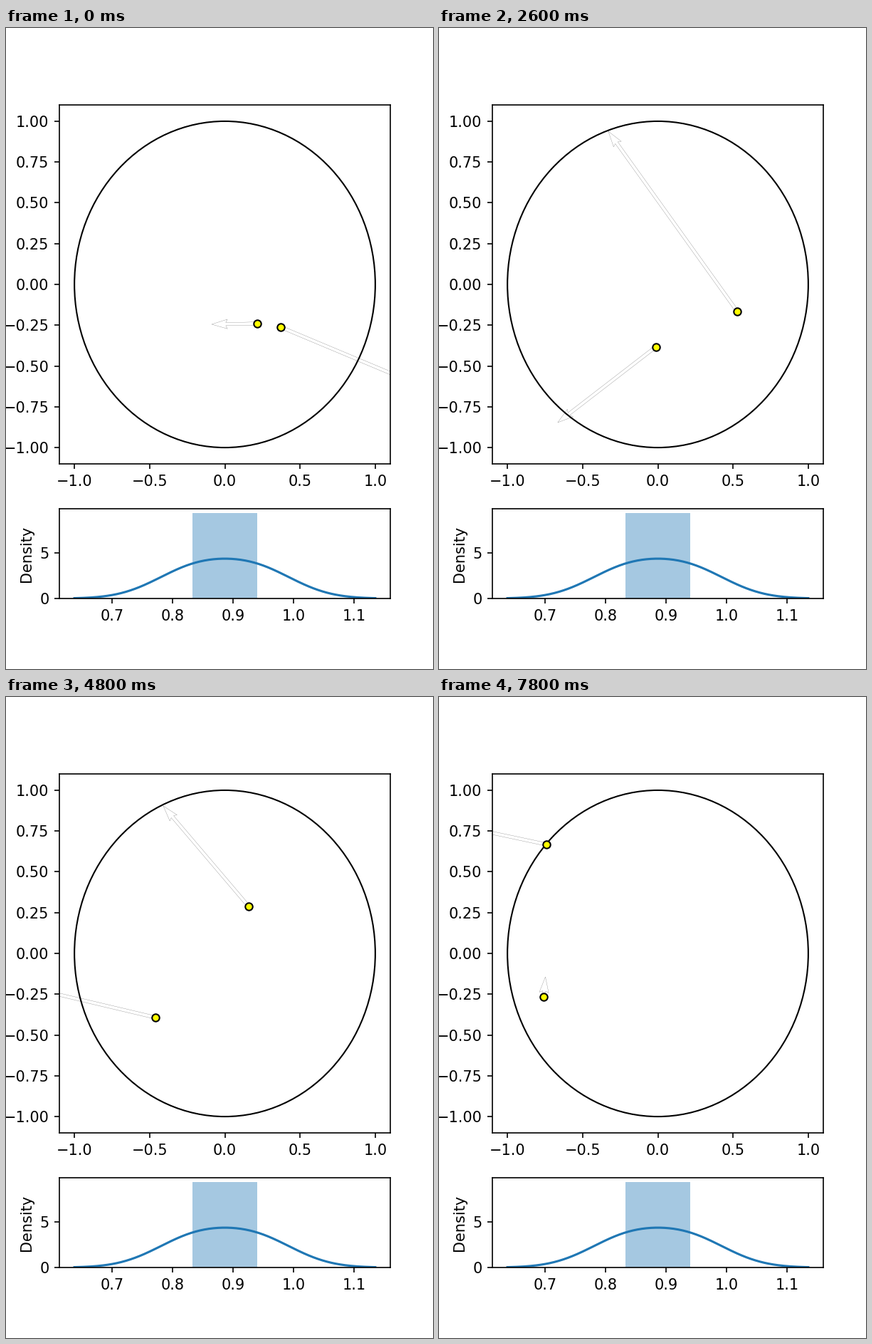
Write a matplotlib script that moves like this. It is 600x900 px and loops after 8000 ms.

```python
import numpy as np
import matplotlib.pyplot as plt
from matplotlib.animation import FuncAnimation

FRAMES, STEP = 40, 200
GAIN = 19.5   # arrow length for a speed of one pixel per frame
BOUNCE = 7    # frame at which the right particle turns back from the wall

# frame: (place, arrow) on the stage in pixels, x + y*j, y down
RIGHT = {0: (386 + 420j, 320 + 134j), 6: (482 + 466j, 320 + 133j),
         10: (452 + 436j, -253 - 239j), 16: (394 + 359j, -153 - 251j),
         24: (341 + 294j, -120 - 141j), 30: (283 + 249j, -280 - 94j),
         39: (151 + 207j, -330 - 70j)}
LEFT = {0: (353 + 415j, -64 + 1j), 6: (340 + 427j, -61 - 6j),
        10: (324 + 434j, -108 + 50j), 16: (283 + 460j, -140 + 32j),
        24: (210 + 450j, -190 - 45j), 30: (168 + 435j, -82 - 61j),
        39: (147 + 421j, 2.5 - 28j)}


def glide(keys, frame):
    """Place on a Hermite curve through the keys, and its velocity arrow."""
    times = sorted(keys)
    if frame < times[0]:
        place, arrow = keys[times[0]]
        return place + arrow / GAIN * (frame - times[0]), arrow
    k = min(np.searchsorted(times, frame, "right"), len(times) - 1)
    t0, t1 = times[k - 1], times[k]
    (p0, a0), (p1, a1) = keys[t0], keys[t1]
    span = t1 - t0
    s = (frame - t0) / span
    mean = (p1 - p0) / span * GAIN
    arrow = (a0 * (1 - s) * (1 - 3 * s) + a1 * s * (3 * s - 2)
             + mean * 6 * s * (1 - s))
    place = (p0 + (p1 - p0) * s * s * (3 - 2 * s)
             + span / GAIN * s * (1 - s) * (a0 * (1 - s) - a1 * s))
    return place, arrow


def legs(keys):
    """Split a path into the parts before and after the bounce."""
    return ({t: v for t, v in keys.items() if t < BOUNCE},
            {t: v for t, v in keys.items() if t >= BOUNCE})


OUTWARD, INWARD = legs(RIGHT)

fig, (box, dens) = plt.subplots(
    2, 1, figsize=(4, 6), dpi=150,
    gridspec_kw=dict(height_ratios=[4, 1], hspace=0.2))

# Particles in a round box
box.set(xlim=(-1.1, 1.1), ylim=(-1.1, 1.1),
        xticks=np.linspace(-1, 1, 5), yticks=np.linspace(-1, 1, 9))
box.add_patch(plt.Circle((0, 0), 1, fill=False, ec="black", lw=1))
arrows = box.quiver([0, 0], [0, 0], [1, 1], [1, 1], angles="uv",
                    units="xy", width=0.02, scale_units="dots", scale=1,
                    facecolor="none", edgecolor="black", linewidth=0.08,
                    zorder=1)
dots, = box.plot([], [], "o", ms=5, mfc="yellow", mec="black", mew=1, zorder=3)

# Histogram and kernel density of two samples
mid, width = 0.8865, 0.106
samples = mid + np.array([-0.5, 0.5]) * width
bw = samples.std(ddof=1) * 2 ** -0.2
x = np.linspace(samples[0] - 3 * bw, samples[1] + 3 * bw, 200)
z = (x[:, None] - samples) / bw
kde = np.exp(-z ** 2 / 2).mean(axis=1) / (bw * np.sqrt(2 * np.pi))
dens.bar(mid, 1 / width, width, color="C0", alpha=0.4)
dens.plot(x, kde, color="C0", lw=1.5)
pad = 0.05 * (x[-1] - x[0])
dens.set(xlim=(x[0] - pad, x[-1] + pad), ylim=(0, 1.05 / width),
         xticks=np.linspace(0.7, 1.1, 5), yticks=[0, 5], ylabel="Density")


def draw(frame):
    right = glide(OUTWARD if frame < BOUNCE else INWARD, frame)
    place, arrow = np.transpose([right, glide(LEFT, frame)])
    px, py = (place.real - 307.5) * 2.2 / 465, (360 - place.imag) * 2.2 / 504
    dots.set_data(px, py)
    arrows.set_offsets(np.column_stack([px, py]))
    arrows.set_UVC(arrow.real, -arrow.imag)
    return arrows, dots


anim = FuncAnimation(fig, draw, frames=FRAMES, interval=STEP,
                     repeat=True, repeat_delay=0, blit=False)
plt.show()
```
